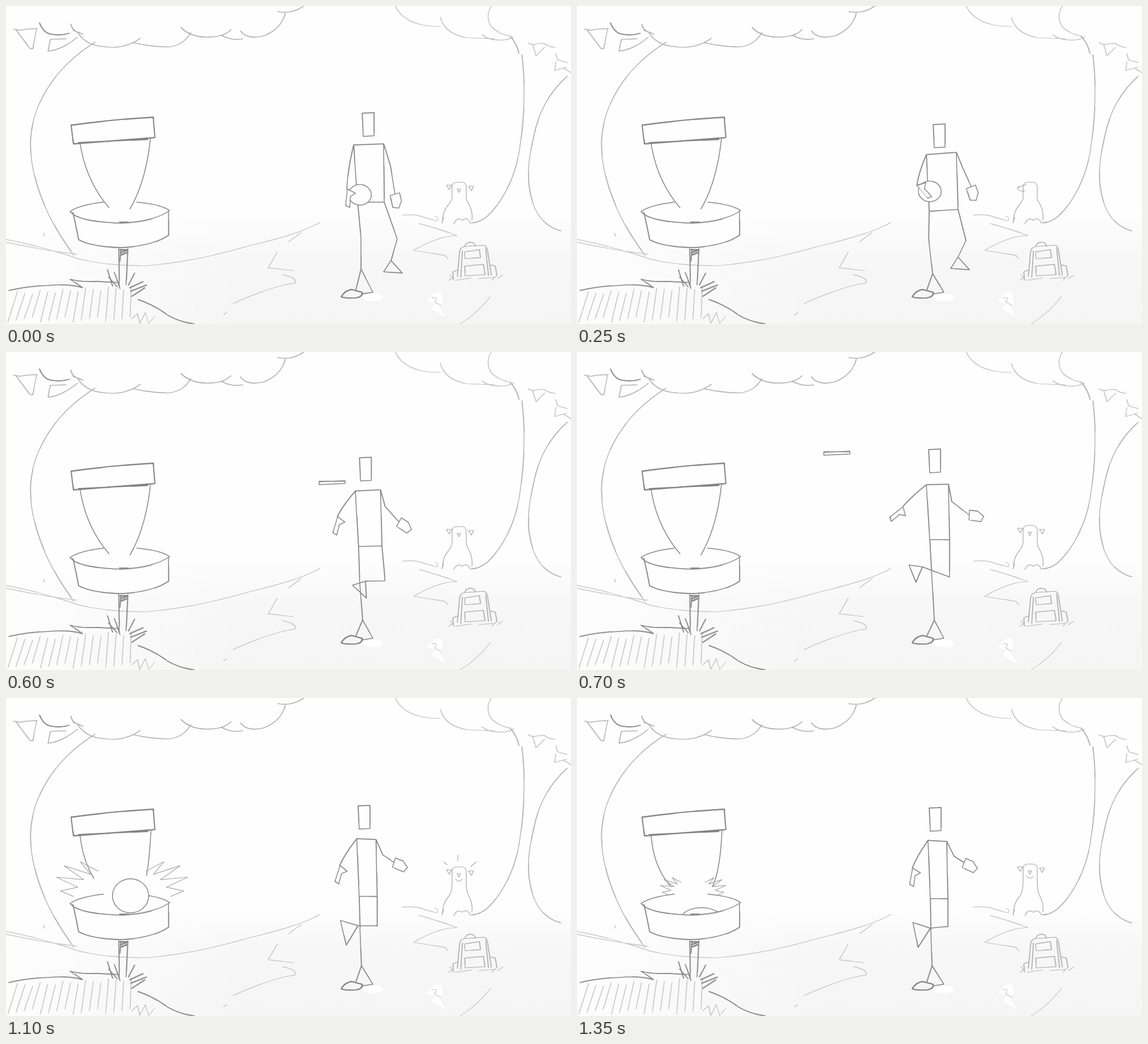
An HTML page for the animation above (1.4 s loop, 998 by 561 pixels).

```html
<!DOCTYPE html>
<html lang="en">
<head>
<meta charset="utf-8">
<title>Disc golf sketch</title>
<style>
  html, body { margin: 0; width: 100%; height: 100%; overflow: hidden; background: #fff; }
  svg { display: block; width: 100vw; height: 100vh; }
  path, ellipse { fill: none; stroke-linecap: round; stroke-linejoin: round; }
  .faint { stroke: #c2c2c2; stroke-width: 1.1; }
  .mid { stroke: #a8a8a8; stroke-width: 1.2; }
  .dark { stroke: #868686; stroke-width: 1.5; }
  .bold { stroke: #828282; stroke-width: 2; }
  .paper { fill: #fefefe; }
  .white { fill: #fff; }
  .retrace { stroke-dasharray: 55 38; opacity: .55; }
</style>
</head>
<body>
<svg viewBox="0 0 998 561" preserveAspectRatio="none">
  <defs>
    <linearGradient id="shade" x1="0" y1="0" x2="0" y2="1">
      <stop offset="0" stop-color="#fefefe"/>
      <stop offset=".4" stop-color="#f7f7f7"/>
      <stop offset="1" stop-color="#f5f5f5"/>
    </linearGradient>
    <linearGradient id="ledge" x1="0" y1="0" x2="1" y2="0">
      <stop offset="0" stop-color="#fff" stop-opacity=".8"/>
      <stop offset="1" stop-color="#fff" stop-opacity="0"/>
    </linearGradient>
  </defs>
  <rect width="998" height="561" fill="#fefefe"/>
  <rect y="365" width="998" height="196" fill="url(#shade)"/>
  <rect y="365" width="420" height="196" fill="url(#ledge)"/>

  <g id="scenery">
    <!-- foliage -->
    <path class="mid" d="M13 41L24 43L36 41L55 40M18 43L42 75L47 76L54 41M78 59L74 80Q100 77 126 55M78 59L106 58
      M114 32Q118 46 130 47M118 43L136 50
      M127 48Q140 67 165 71Q210 78 237 57M225 65Q260 73 290 72Q315 68 326 47M309 38Q325 55 355 55Q385 55 397 42
      M380 52Q400 62 418 58M414 44Q425 60 455 53Q487 40 493 13M480 10Q505 15 526 0"/>
    <path class="dark" d="M59 30Q66 48 80 50Q97 53 112 48"/>
    <path class="faint" d="M687 0Q705 37 767 36M767 20Q775 50 815 56L862 58M840 51Q855 62 880 60Q893 58 897 54
      M857 0Q845 20 858 38Q872 50 890 53M922 65Q930 70 937 67L950 66Q960 73 970 73M930 68L936 88L951 73
      M971 84L974 95L991 100M971 98L969 114L990 108M985 110L998 118"/>
    <!-- trunks -->
    <path class="mid" d="M157 64C80 112 45 180 43 240C43 310 75 380 120 440M890 53Q902 66 906 84
      M911 86C919 150 914 210 906 260C897 305 878 345 850 371Q838 381 824 383
      M991 124Q945 165 932 230Q918 290 925 325Q935 385 980 397"/>
    <!-- ground -->
    <path class="faint" d="M0 412Q60 423 130 447Q190 460 250 458Q330 452 430 423Q520 402 554 382M0 417Q60 430 125 438
      M521 400L499 416M479 434L463 462L508 467M488 474Q515 480 510 489Q470 494 401 525M390 541L384 545
      M66 401L68 406M700 369Q725 367 735 372Q755 378 762 379Q765 372 757 371M730 384Q760 392 797 405Q765 405 720 431
      L775 440L780 446M855 513Q835 540 802 561"/>
    <path class="dark" d="M5 502Q40 494 75 493Q110 490 135 497L113 482Q130 487 160 486L195 488M233 518Q260 527 285 545Q305 557 332 561"/>
    <path class="faint" d="M222 552L232 543L236 560L246 541L252 560L263 547"/>
    <path id="hatch" class="faint"/>
    <!-- backpack -->
    <path class="mid" d="M797 477L801 434Q802 424 815 424L844 422Q850 424 851 436L857 475M803 479L806 432M847 428L852 476
      M810 424Q813 416 822 417Q828 418 829 424M810 434L836 430L838 444L811 446ZM810 459L843 456L846 474L811 476Z
      M797 466L789 469L790 483M856 457L864 459L867 476"/>
    <path class="faint" d="M782 484L788 480M784 474L791 484M794 484L822 480M835 481L862 479M858 484L866 476M868 481L877 475"/>
  </g>
  <use href="#scenery" x=".8" y="-.5" class="retrace"/>
  <path class="white" d="M743 520L757 506L768 505L772 520L766 530L776 549L752 535L757 526Z"/>
  <path class="faint" d="M752 515Q765 512 757 522L768 528"/>

  <!-- basket -->
  <path id="chains" class="dark"/>
  <path class="dark" d="M172 346Q130 351 114 362M231 346Q275 350 289 361"/>
  <ellipse id="disc" class="dark paper"/>
  <path class="paper" d="M117 363Q150 384 205 383Q255 380 288 362L287 404Q260 423 205 426Q150 425 128 412Z"/>
  <g id="basket">
    <path class="bold" d="M115 210Q190 200 260 196L263 232L119 243ZM128 241L250 235"/>
    <path class="dark" d="M113 362Q125 380 200 383Q260 381 289 361M118 364Q124 390 128 412Q150 425 205 426Q260 423 287 404L287 363
      M199 428L200 490M215 428L212 492M203 429L201 450M200 381H216"/>
    <path class="bold" d="M201 430H214M202 435L213 431M203 439L213 435"/>
    <path class="dark" d="M188 494L179 465M196 495L181 478M200 493L191 470M201 498L196 484M216 492L227 471M218 497L242 486M220 503L248 492M222 512L245 497"/>
  </g>
  <use href="#basket" x=".8" y=".7" class="retrace"/>
  <path id="splash" class="mid"/>

  <!-- dog -->
  <path class="mid paper" d="M770 383L773 373M791 384Q797 371 806 378Q815 371 820 383L830 381"/>
  <path id="dog" class="mid"/>

  <!-- player -->
  <ellipse cx="648" cy="514" rx="18" ry="7" class="white"/>
  <g id="player">
    <path class="bold" d="M592 513Q598 502 610 500L629 505Q630 513 618 515Q600 516 592 513Z"/>
    <path id="body" class="dark"/>
    <ellipse id="held" class="dark paper" rx="20" ry="18"/>
    <path id="hands" class="dark paper"/>
  </g>
  <use href="#player" x=".6" y=".4" class="retrace"/>
  <path id="flying" class="dark paper"/>
</svg>
<script>
const LOOP = 1400, STEP = 50;
const CROUCH = 250, RELEASE = 600, THROW = 700, HIT = 1100, END = 1350;
const $ = id => document.getElementById(id);

// Each joint: ready, crouch, throw, finish
const rig = {
  head:      [[629, 189], [629, 209], [621, 172], [622, 194]],
  shoulderL: [[614, 245], [617, 262], [617, 234], [620, 251]],
  shoulderR: [[667, 243], [670, 258], [656, 233], [653, 253]],
  hipL:      [[621, 346], [622, 362], [623, 331], [624, 354]],
  hipR:      [[668, 346], [673, 359], [658, 331], [655, 354]],
  elbowR:    [[679, 282], [681, 285], [662, 264], [666, 279]],
  wristL:    [[602, 323], [600, 317], [575, 273], [592, 300]],
  wristR:    [[687, 331], [696, 318], [692, 287], [683, 290]],
  kneeL:     [[627, 410], [621, 410], [627, 400], [625, 410]],
  kneeR:     [[691, 411], [687, 414], [658, 397], [655, 403]],
  ankleL:    [[627, 464], [628, 472], [631, 473], [627, 472]],
  ankleR:    [[680, 449], [673, 443], [610, 379], [624, 406]],
  angles:    [[90, 80, 0], [45, 75, 0], [137, 10, 65], [95, 28, 75]]  // hands L and R, foot
};
const handL = [[0, -1], [7, -15], [13, -6], [32, -5], [29, 2]];
const handR = [[0, -8], [14, -9], [26, -2], [23, 8], [2, 9]];
const foot = [[0, 0], [20, 22], [-13, 20]];

const mix = (a, b, k) => a.map((v, i) => v + (b[i] - v) * k);
const span = (t, from, to) => Math.min(1, Math.max(0, (t - from) / (to - from)));
const settle = t => (1 - Math.exp(-(t - THROW) / 300)) / (1 - Math.exp(-(END - THROW) / 300));
const line = (...pts) => "M" + pts.map(p => p.map(v => v.toFixed(1)).join(" ")).join("L");
const shape = pts => line(...pts) + "Z";
const quad = (a, c, b) => `M${a}Q${c} ${b}`;
const path = (id, d) => $(id).setAttribute("d", d);
const show = (id, on) => $(id).style.display = on ? "" : "none";

function set(id, attrs) {
  for (const name in attrs) $(id).setAttribute(name, attrs[name]);
}

function turn(pts, [x, y], degrees) {
  const a = degrees * Math.PI / 180, c = Math.cos(a), s = Math.sin(a);
  return pts.map(([u, v]) => [x + u * c - v * s, y + u * s + v * c]);
}

// Dip with a soft stop, accelerate into the throw, then settle
function poseAt(t) {
  const [from, k] = t < CROUCH ? [0, Math.sin(t / CROUCH * Math.PI / 2)]
    : t < THROW ? [1, span(t, CROUCH, THROW) ** 2]
    : [2, settle(t)];
  const pose = {};
  for (const joint in rig) pose[joint] = mix(rig[joint][from], rig[joint][from + 1], k);
  return pose;
}

function drawPlayer(t, p) {
  const [x, y] = p.head, [left, right, toe] = p.angles;
  const bend = mix(p.shoulderL, p.wristL, .55);
  const size = 1 + .35 * span(t, THROW, HIT);
  const shoe = foot.map(pt => pt.map(v => v * size));
  path("body",
    shape([[x, y], [x + 21, y - 1], [x + 21, y + 40], [x + 2, y + 41]]) +
    shape([p.shoulderL, p.shoulderR, p.hipR, p.hipL]) +
    quad(p.shoulderL, [bend[0] - 4, bend[1]], p.wristL) +
    line(p.shoulderR, p.elbowR, p.wristR) +
    line(p.hipL, p.kneeL, p.ankleL) +
    line(p.hipR, p.kneeR, p.ankleR) +
    line([618, 500], p.ankleL, [648, 505], [628, 508]) +
    shape(turn(shoe, p.ankleR, toe)));
  path("hands", shape(turn(handL, p.wristL, left)) + shape(turn(handR, p.wristR, right)));
}

function drawDisc(t, p) {
  const landing = 1000;
  show("held", t < RELEASE);
  show("flying", t >= RELEASE && t < landing);
  show("disc", t >= landing);
  set("held", { cx: p.wristL[0] + 23, cy: p.wristL[1] + 10 });

  const hover = [459, 176], dip = [431, 188], hit = [220, 349];
  const [x, y] = t < THROW ? mix([576, 228], hover, span(t, RELEASE, THROW))
    : t < 900 ? mix(hover, dip, span(t, THROW, 900))
    : mix(dip, hit, span(t, 900, HIT));
  const tilt = span(t, THROW, 900), w = 23 + 6 * tilt;
  const back = [[x - w + 26 * tilt, y - 7 * tilt], [x + w + 23 * tilt, y - 10 * tilt]];
  path("flying", shape([[x - w, y + 1], ...back, [x + w, y + 4], [x - w, y + 6]]) + line([x - w, y + 1], [x + w, y - 1]));

  const near = span(t, 900, HIT), sink = span(t, HIT, END);
  set("disc", { cx: x, cy: y + 40 * sink, rx: 25 + 7 * near + 4 * sink, ry: 30 * near - 11 * sink });
}

function drawBasket(t) {
  const hit = t >= HIT, k = span(t, HIT, END);
  path("chains", hit
    ? quad([131, 243], [135, 285 + 13 * k], mix([155, 318], [166, 333], k)) +
      quad([256, 235], [253, 290 + 15 * k], mix([248, 313], [239, 333], k))
    : quad([131, 243], [141, 308], [182, 356]) + quad([255, 235], [247, 310], [219, 358]));

  show("splash", hit);
  let d = "";
  for (const side of [-1, 1]) {
    const spikes = [];
    for (let i = 0; i < 9; i++) {
      const a = (43 - i * 5.8) * Math.PI / 180;
      const r = (i % 2 ? 80 + 40 * Math.sin(i / 3) : 58 + i * 3.5) * (1 - .5 * k);
      spikes.push([205 + side * r * Math.cos(a), 345 - r * Math.sin(a)]);
    }
    d += line(...spikes);
  }
  path("splash", d);
}

function drawDog(t) {
  const top = 311 - 18 * span(t, 450, END), l = 788, r = 813, x = 800;
  let d = `M771 380Q771 362 782 350Q788 342 ${l} ${top + 28}V${top + 7}Q${l + 1} ${top} ${l + 8} ${top}` +
    `H${r - 7}Q${r} ${top + 1} ${r} ${top + 9}V${top + 28}Q813 343 818 350Q825 364 823 378`;
  if (t >= 150 && t < RELEASE) {
    d += `M794 ${top + 4}Q786 ${top + 7} 779 ${top + 8}L778 ${top + 11}Q782 ${top + 17} 791 ${top + 15}M779 ${top + 9}h3`;
  } else {
    const y = top + 5;
    d += `M${l - 10} ${y}h9l-4 8ZM${r + 4} ${y + 2}h9l-4 8ZM${x - 3} ${y + 7}h6l-3 6Z`;
    if (t >= landingSmile) d += `M${x - 6} ${y + 16}q6 8 12 0`;
    if (t >= HIT - STEP && t < HIT + 150) d += "M798 277V287M773 289L779 294M831 289L821 297";
  }
  path("dog", d);
}
const landingSmile = 1000;

function draw(t) {
  const pose = poseAt(t);
  drawPlayer(t, pose);
  drawDisc(t, pose);
  drawBasket(t);
  drawDog(t);
}

let hatch = "";
for (let i = 0; i < 16; i++) {
  const x = 20 + i * 13.4;
  hatch += `M${x} ${504 - i * .7 + i % 3 * 3}L${x - 17 + i} ${558 - i % 4 * 3}`;
}
path("hatch", hatch);

let last = -1;
function tick() {
  const t = Math.floor(performance.now() % LOOP / STEP) * STEP;
  if (t !== last) draw(last = t);
  requestAnimationFrame(tick);
}
tick();
</script>
</body>
</html>
```
